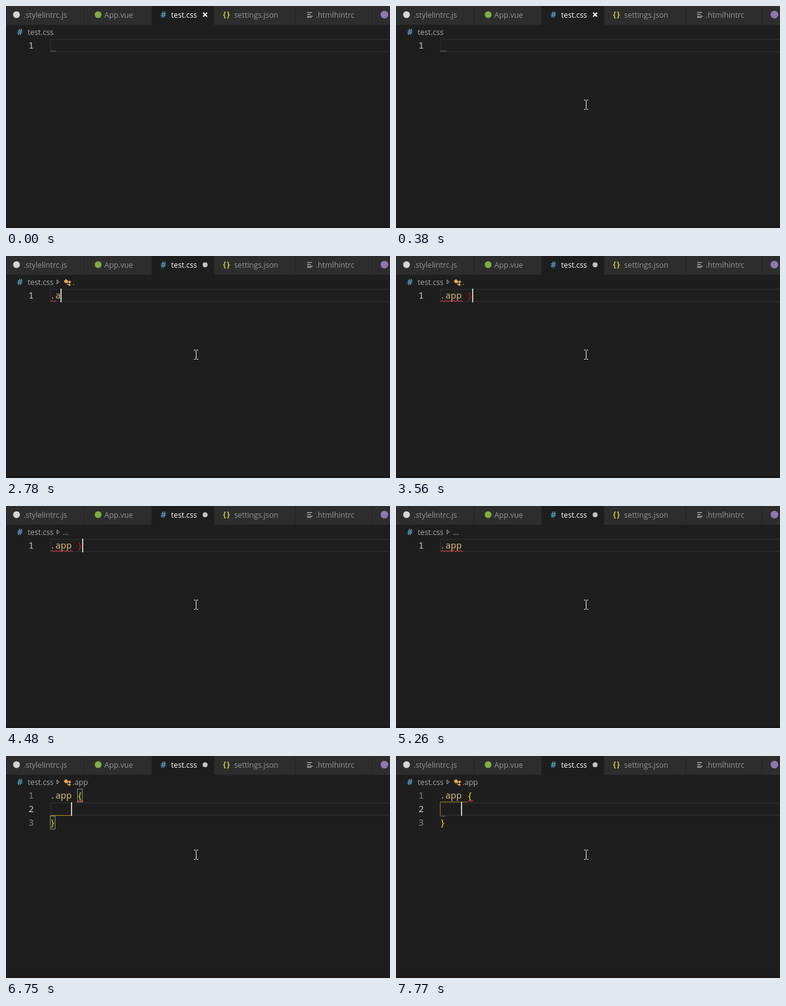
Recreate the animation shown at these times as an HTML page. Size 621x360 px, loop 8000 ms.

```html
<!DOCTYPE html>
<html lang="en">
<head>
<meta charset="utf-8">
<title>Editor typing</title>
<style>
html, body { margin: 0; width: 621px; height: 360px; overflow: hidden; background: #1e1e1e; }
svg { display: block; }
text { white-space: pre; }
.ui { font: 12.2px "Open Sans", "Noto Sans", sans-serif; fill: #969696; }
.mono { font: 14.67px "Noto Sans Mono", "DejaVu Sans Mono", monospace; }
.hash { font: bold 14px "Open Sans", sans-serif; fill: #519aba; }
.line { fill: none; stroke-width: 1; }
</style>
</head>
<body>
<svg id="stage" width="621" height="360" viewBox="0 0 621 360"></svg>
<script>
const LOOP = 8000, CELL = 8.8, LEFT = 71, TOP = 53, ROW = 22;
const stage = document.getElementById('stage');

function add(parent, tag, attrs, content) {
  const el = document.createElementNS('http://www.w3.org/2000/svg', tag);
  for (const key in attrs) el.setAttribute(key, attrs[key]);
  if (content !== undefined) el.textContent = content;
  parent.appendChild(el);
  return el;
}
const group = () => add(stage, 'g', {});
const rect = (p, x, y, width, height, fill) => add(p, 'rect', { x, y, width, height, fill });
const path = (p, d, stroke, extra) => add(p, 'path', { d, stroke, class: 'line', ...extra });
const label = (p, x, y, s, fill) => add(p, 'text', { x, y, class: 'ui', style: fill ? 'fill:' + fill : '' }, s);
const mono = (p, x, y, s, fill) => add(p, 'text', { x, y, class: 'mono', fill }, s);
const dot = (p, cx, cy, r, fill) => add(p, 'circle', { cx, cy, r, fill });

// Fixed window parts
const back = group();
rect(back, 0, 0, 621, 360, '#1e1e1e');
rect(back, 0, 0, 621, 30.5, '#2d2d2d');
rect(back, 235, 0, 101, 31, '#1e1e1e');
for (const x of [126, 235, 336, 468, 591]) rect(back, x, 0, 1, 30.5, '#232324');
rect(back, 0, 356, 621, 4, '#191919');

dot(back, 17, 14, 5.5, '#d4d7d6');
label(back, 28.5, 19, '.stylelintrc.js');
dot(back, 149, 14, 5.5, '#7fae42');
label(back, 159, 19, 'App.vue');
add(back, 'text', { x: 250, y: 19, class: 'hash' }, '#');
label(back, 267, 19, 'test.css', '#fff');
add(back, 'text', { x: 351, y: 18, fill: '#cbcb41', style: 'font:bold 12px "Open Sans",sans-serif', 'letter-spacing': 1.5 }, '{}');
label(back, 369, 19, 'settings.json');
path(back, 'M487 10.5h8M487 13.5h6M487 16.5h9M487 18.5h7', '#c4c7c6', { 'stroke-width': 1.2 });
label(back, 501, 19, '.htmlhintrc');
dot(back, 612, 14, 6.2, '#8f78b0');
add(back, 'text', { x: 18, y: 47, class: 'hash' }, '#');
label(back, 35, 47, 'test.css', '#a9a9a9');

// Parts that depend on the editing state
const closeMark = path(stage, 'M318.8 10.8l6.4 6.4m0-6.4l-6.4 6.4', '#fff', { style: 'stroke-width:2' });
const dirtyMark = dot(stage, 322, 14.2, 4, '#c5c5c5');
const editor = group();
const caret = rect(stage, 0, 0, 2, ROW, '#c4c4c2');
const pointer = path(stage, 'M-3.5 -7.5h2.5l1 1l1 -1h2.5M0 -6.5v13M-3.5 7.5h2.5l1 -1l1 1h2.5', '#f0f0f0');

// Each step changes only the fields it names
const steps = [
  { t: 0, code: [''], row: 0, col: 0, on: 0, crumb: '', wave: [0, 1, '#6f6f6f'], match: 0, guide: 0 },
  { t: 460, on: 1 }, { t: 920, on: 0 }, { t: 1380, on: 1 }, { t: 1850, on: 0 }, { t: 2310, on: 1 },
  { t: 2480, code: ['.'], col: 1, wave: null },
  { t: 2630, crumb: '.', wave: [0, 1, '#f44747'] },
  { t: 2780, code: ['.a'], col: 2 },
  { t: 2870, code: ['.ap'], col: 3 },
  { t: 2980, code: ['.app'], col: 4 },
  { t: 3110, wave: [0, 4, '#f44747'] },
  { t: 3240, code: ['.app '], col: 5 },
  { t: 3560, code: ['.app }'], col: 6 },
  { t: 3720, crumb: '...' },
  { t: 4020, code: ['.app }', ''], row: 1, col: 0 },
  { t: 4480, code: ['.app }'], row: 0, col: 6 },
  { t: 4650, code: ['.app '], col: 5 },
  { t: 5110, on: 0 },
  { t: 5340, code: ['.app {}'], col: 6, on: 1, match: 1 },
  { t: 5570, crumb: '.app', wave: [5, 1, '#f44747'] },
  { t: 6110, code: ['.app '], col: 5, crumb: '...', wave: [0, 4, '#f44747'], match: 0 },
  { t: 6280, code: ['.app {}'], col: 6, match: 1 },
  { t: 6420, crumb: '.app', wave: [5, 1, '#f44747'] },
  { t: 6580, code: ['.app {', '', '}'], row: 1, col: 4 },
  { t: 6750, guide: 1 },
  { t: 6830, match: 0 },
  { t: 6990, guide: 2 },
  { t: 7220, on: 0 }, { t: 7770, on: 1 }
];
let last = {};
const states = steps.map(step => last = { ...last, ...step });

function drawCrumb(s) {
  if (!s) return;
  path(editor, 'M82.5 38.8v6.4l3.7 -3.2z', '#a9a9a9');
  if (s === '...') return label(editor, 92, 47, s, '#a9a9a9');
  path(editor, 'M97 42.5h5M99.5 42.5v4h3', '#e0a04c');
  const diamond = (x, y, r) => add(editor, 'path', { d: `M${x - r} ${y}l${r} ${-r}l${r} ${r}l${-r} ${r}z`, fill: '#e8a952' });
  diamond(97, 41, 3.8);
  diamond(103, 42, 2.5);
  diamond(102.5, 46.5, 2.3);
  label(editor, 107.5, 47, s, '#a9a9a9');
}

function drawWave([col, count, color]) {
  const x = LEFT + 1 + col * CELL, n = Math.round(count * CELL / 3);
  let d = `M${x} 74`;
  for (let i = 0; i < n; i++) d += `l3 ${i % 2 ? 2 : -2}`;
  path(editor, d, color);
}

function drawLine(text, i, s) {
  const base = TOP + i * ROW + 16;
  mono(editor, 36.2, base, String(i + 1), i === s.row ? '#c6c6c6' : '#858585');
  const name = text.match(/^\.\w*/);
  if (name) mono(editor, LEFT, base, name[0], '#d7ba7d');
  [...text].forEach((ch, col) => {
    if (ch !== '{' && ch !== '}') return;
    const x = LEFT + col * CELL, stray = !s.code.join('').includes('{');
    if (s.match) {
      add(editor, 'rect', { x: Math.round(x) + .5, y: TOP + i * ROW + .5, width: 8, height: ROW - 1, fill: '#17291c', stroke: '#888' });
    }
    mono(editor, x, base, ch, stray ? '#d21414' : '#ffd700');
  });
}

function draw(s) {
  editor.replaceChildren();
  closeMark.style.display = s.t < 2480 ? '' : 'none';
  dirtyMark.style.display = s.t < 2480 ? 'none' : '';
  const y = TOP + s.row * ROW;
  path(editor, `M621 ${y + 1}H72V${y + 21}H621`, '#282828', { style: 'stroke-width:2' });
  drawCrumb(s.crumb);
  s.code.forEach((text, i) => drawLine(text, i, s));
  if (s.wave) drawWave(s.wave);
  if (s.guide === 1) path(editor, 'M72 96.5H106', '#a58d12');
  if (s.guide === 2) {
    path(editor, 'M115 74.5H71.5V97', '#8f7b14');
    path(editor, 'M72 97.5h8', '#7d7041');
  }
  caret.setAttribute('x', LEFT + Math.floor(s.col * 8.7));
  caret.setAttribute('y', y);
  caret.style.display = s.on ? '' : 'none';
}

function movePointer(t) {
  const k = Math.min(1, Math.floor((t - 70) / 75 + 1) / 5);
  const far = (1 - k) ** 1.5 / .8 ** 1.5;
  pointer.style.display = t < 70 ? 'none' : '';
  pointer.setAttribute('transform', `translate(${Math.round(307 + 125 * far) + .5} ${Math.round(160 + 75 * far)})`);
}

let shown = null, start = performance.now();
function tick(now) {
  const t = Math.max(0, now - start) % LOOP;
  const state = states.findLast(s => s.t <= t);
  if (state !== shown) draw(shown = state);
  movePointer(t);
  requestAnimationFrame(tick);
}
tick(start);
</script>
</body>
</html>
```
